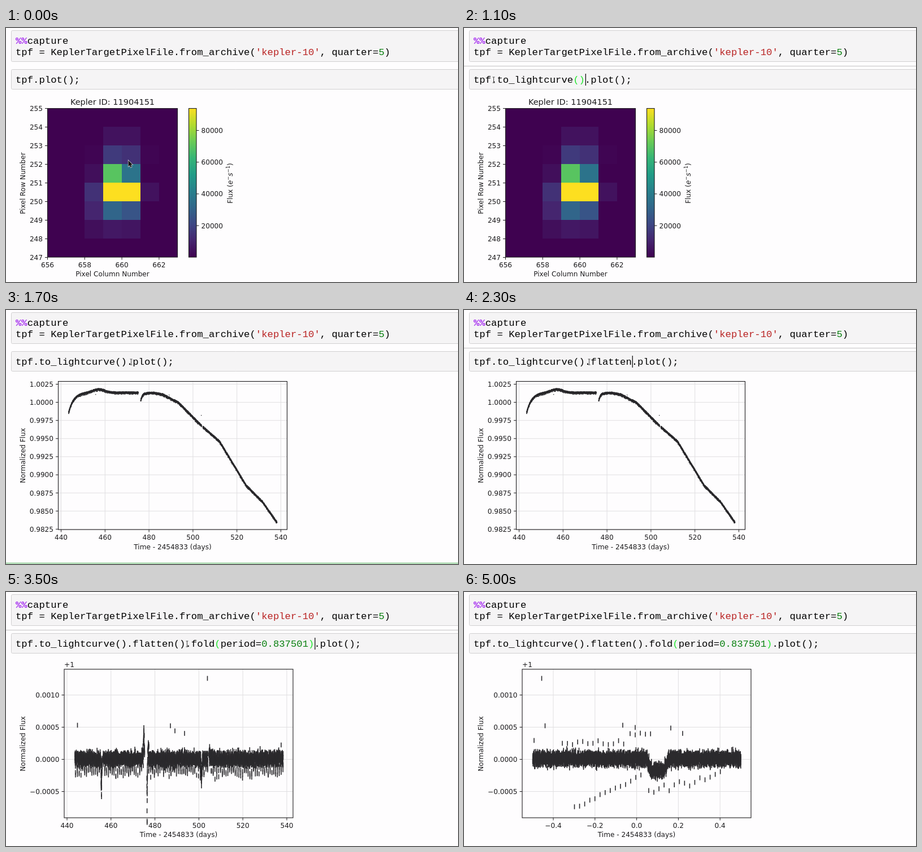
These frames come from a looping animation (800x450 px, 5100 ms). An HTML page with a canvas:

```html
<!DOCTYPE html>
<html lang="en">
<head>
<meta charset="utf-8">
<title>Light curve notebook</title>
<style>
html, body { margin: 0; width: 100%; height: 100%; overflow: hidden; background: #fefdfe; }
canvas { display: block; }
</style>
</head>
<body>
<canvas id="stage" width="800" height="450"></canvas>
<script>
const c = document.getElementById('stage').getContext('2d');
const LOOP = 5100, STEP = 100;
const INK = '#1c1b1d', MARK = '#2c2b2e', BRACKET = '#1fe62c', GREEN = '#0a8010';
const MONO = '17.27px "Liberation Mono", "Courier New", monospace';
const SANS = '"DejaVu Sans", sans-serif';
const CODE_X = 17, CODE_Y = 97;

// Each edit: click into the cell, type between start and end, then run.
const edits = [
  { click: 400, start: 500, end: 1000, run: 1200, text: '.to_lightcurve()' },
  { click: 1900, start: 2000, end: 2400, run: 2500, text: '.flatten()' },
  { click: 3000, start: 3100, end: 3500, run: 3700, text: '.fold(period=0.837501)' }
];

const clamp = v => Math.max(0, Math.min(1, v));
const lerp = (a, b, k) => a + (b - a) * k;
const ease = k => k * k * (3 - 2 * k);

function random(seed) {
  return () => (seed = (seed * 16807) % 2147483647) / 2147483647;
}

function line(x1, y1, x2, y2, color = INK, width = 1) {
  c.strokeStyle = color;
  c.lineWidth = width;
  c.beginPath();
  c.moveTo(x1, y1);
  c.lineTo(x2, y2);
  c.stroke();
}

function label(text, x, y, align = 'center', size = 12.1) {
  c.font = `${size}px ${SANS}`;
  c.fillStyle = INK;
  c.textAlign = align;
  c.fillText(text, x, y);
}

function vertical(x, y, draw) {
  c.save();
  c.translate(x, y);
  c.rotate(-Math.PI / 2);
  draw();
  c.restore();
}

/* ---------- notebook cells ---------- */

function cell(y, h) {
  c.fillStyle = '#f5f4f5';
  c.strokeStyle = '#d1d0d1';
  c.lineWidth = 1;
  c.beginPath();
  c.roundRect(9.5, y + .5, 820, h, 2);
  c.fill();
  c.stroke();
}

function code(parts, y) {
  let x = CODE_X;
  c.textAlign = 'left';
  for (const [text, color = '#000', bold = ''] of parts) {
    c.font = bold + MONO;
    c.fillStyle = color;
    c.fillText(text, x, y);
    x += c.measureText(text).width;
  }
}

// The bracket pair next to the caret, as two indices.
function matched(left) {
  const end = left.length;
  if (left.endsWith(')')) return [left.lastIndexOf('('), end - 1];
  return left.endsWith('(') ? [end - 1, end] : [];
}

function commandLine(t) {
  let left = 'tpf', right = '.plot();';
  const begun = edits.filter(e => t >= e.click), active = begun.at(-1);
  for (const e of begun) {
    const k = clamp((t - e.start + STEP) / (e.end - e.start + STEP));
    const typed = e.text.slice(0, Math.round(e.text.length * k));
    left += typed;
    if (typed.includes('(') && !typed.includes(')')) right = ')' + right;
  }
  const editing = active && t < active.run;
  const pair = editing || begun.length > 1 ? matched(left) : [];
  const text = left + right, number = text.search(/\d/);
  const isDigit = (ch, i) => number >= 0 && i >= number && i < number + 8 && /[\d.]/.test(ch);
  code([...text].map((ch, i) =>
    [ch, pair.includes(i) ? BRACKET : isDigit(ch, i) ? GREEN : '#000']), CODE_Y);
  if (editing) {
    const x = CODE_X + c.measureText(left).width + 1.5;
    line(x, 81, x, 102, '#111', 1.3);
    line(0, 67.5, 800, 67.5, '#c3c2c3');
  }
}

/* ---------- pointer ---------- */

function arrow(x, y) {
  c.beginPath();
  [[0, 0], [0, 11], [2.4, 8.8], [4.2, 12.4], [6, 11.6], [4.4, 8], [7.6, 7.8]]
    .forEach(([dx, dy]) => c.lineTo(x + dx, y + dy));
  c.closePath();
  c.fillStyle = '#111';
  c.strokeStyle = '#eee';
  c.lineWidth = 1.2;
  c.stroke();
  c.fill();
}

function beam(x, y) {
  line(x, y - 5, x, y + 5, '#444');
  for (const d of [-5, 5]) line(x - 2, y + d, x + 2, y + d, '#555');
}

function pointer(t) {
  if (t < 400) {
    const k = ease(clamp(t / 400));
    const x = lerp(216.5, 52.5, k), y = lerp(234.5, 92, k);
    y < 108 ? beam(x, y) : arrow(x, y);
  } else if (t < 2400) {
    beam(lerp(52.5, 221.5, ease(clamp((t - 1200) / 400))), 92);
  } else if (t >= 2800 && t < 3700) {
    beam(lerp(221.5, 320.5, ease(clamp((t - 2700) / 300))), 92);
  }
}

/* ---------- plots ---------- */

const ticks = (n, pos, step, text) => Array.from({ length: n }, (_, i) => [pos + i * step, text(i)]);
const days = x => ticks(6, x, 77.8, i => 440 + 20 * i);
const fixed = (v, n) => v.toFixed(n).replace('-', '−');

function axes(x, y, w, h, xTicks, yTicks, grid = true) {
  for (const [px, text] of xTicks) {
    if (grid) line(px, y, px, y + h, '#e0dfe1');
    line(px, y + h, px, y + h + 4.5);
    label(text, px, y + h + 18);
  }
  for (const [py, text] of yTicks) {
    if (grid) line(x, py, x + w, py, '#e0dfe1');
    line(x - 4.5, py, x, py);
    label(text, x - 8.5, py + 4.4, 'right');
  }
}

function box(x, y, w, h) {
  c.strokeStyle = INK;
  c.lineWidth = 1.1;
  c.strokeRect(x, y, w, h);
}

const palette = ['3f0250', '45256f', '3d4784', '31668a', '28808c', '219c87', '36b576', '6acb55', 'b2db2e', 'fddf20']
  .map(s => [0, 2, 4].map(i => parseInt(s.slice(i, i + 2), 16)));

function viridis(v) {
  const p = v * (palette.length - 1), i = Math.min(palette.length - 2, Math.floor(p));
  return `rgb(${palette[i].map((a, j) => Math.round(lerp(a, palette[i + 1][j], p - i)))})`;
}

// Percent of full flux around the star.
const flux = [
  [0, 5, 5, 0], [1, 18, 15, 1], [4, 74, 39, 0],
  [15, 100, 100, 5], [11, 33, 27, 0], [4, 7, 6, 0]
];

function pixelPlot() {
  c.fillStyle = viridis(0);
  c.fillRect(73, 142, 231, 264);
  flux.forEach((row, j) => row.forEach((v, i) => {
    c.fillStyle = viridis(v / 100);
    c.fillRect(139 + i * 33, 175 + j * 33, 33, 33);
  }));
  axes(73.5, 142.5, 230, 263.5,
    ticks(4, 73.5, 65.8, i => 656 + 2 * i), ticks(9, 142.5, 33, i => 255 - i), false);
  box(73.5, 142.5, 230, 263.5);
  label('Kepler ID: 11904151', 188.5, 135.5, 'center', 14.5);
  label('Pixel Column Number', 188.5, 440);
  vertical(34, 275, () => label('Pixel Row Number', 0, 0));

  const ramp = c.createLinearGradient(0, 406, 0, 142);
  palette.forEach((_, i) => ramp.addColorStop(i / 9, viridis(i / 9)));
  c.fillStyle = ramp;
  c.fillRect(324, 142, 13, 264);
  box(323.5, 142.5, 13.5, 263.5);
  for (let i = 1; i < 5; i++) {
    const y = 406.3 - i * 56.2;
    line(337, y, 341.5, y);
    label(i * 20000, 345.5, y + 4.4, 'left');
  }
  vertical(400.5, 311, () => {
    let x = 0;
    const put = (text, size = 12.1, up = 0, style = '') => {
      c.font = `${style}${size}px ${SANS}`;
      c.fillText(text, x, -up);
      x += c.measureText(text).width;
    };
    c.textAlign = 'left';
    c.fillStyle = INK;
    put('Flux (');
    put('e', 12.1, 0, 'italic ');
    put('−', 8.5, 4.5);
    put('s', 12.1, 0, 'italic ');
    put('−1', 8.5, 4.5);
    put(')');
  });
}

// Key points of the long decline.
const decline = [[238, 147], [262, 147], [278, 150], [305, 164], [346, 205], [378, 233],
  [410, 286], [425, 311], [454, 340], [480, 377]];

function brightness(x) {
  if (x < 236) return 146.5 + 35 * Math.exp((111 - x) / 9) - 6 * Math.exp(-(((x - 164) / 15) ** 2));
  const i = decline.findIndex(p => p[0] > x), [x0, y0] = decline[i - 1], [x1, y1] = decline[i];
  return lerp(y0, y1, (x - x0) / (x1 - x0)) + 14 * Math.exp((238.5 - x) / 3);
}

function lightCurve() {
  const rnd = random(11);
  axes(92.5, 126.5, 405, 262.5, days(97.5),
    ticks(9, 131.5, 32.1, i => (1.0025 - i * .0025).toFixed(4)));
  c.fillStyle = MARK;
  for (let x = 111; x < 479.5; x += .06) {
    if ((x > 234 && x < 238.5) || (x > 346 && x < 348.5)) continue;
    const dip = rnd() < .1 ? 1.6 : 0;
    c.fillRect(x - .8, brightness(x) - .8 + (rnd() + rnd() - 1) * 1.9 + dip, 1.6, 1.6);
  }
  for (const [x, y] of [[158, 149], [288, 150], [334, 197], [345, 186]]) c.fillRect(x, y, 1.3, 1.3);
  box(92.5, 126.5, 405, 262.5);
  label('Time - 2454833 (days)', 295, 423.5);
  vertical(34, 258, () => label('Normalized Flux', 0, 0));
}

function bar(x, y) {
  c.fillRect(x - .8, y - 4.3, 1.6, 8.6);
}

// Flattened samples: noise plus a periodic transit dip.
function samples(visit) {
  const rnd = random(2024), period = .837501;
  for (let i = 0; i < 4650; i++) {
    const day = (i + rnd()) * .02043;
    const phase = (day / period + .31) % 1 - .5;
    const noise = (rnd() + rnd() + rnd() + rnd() - 2) * 10;
    const dip = 20.5 * clamp((.052 - Math.abs(phase - .1)) / .02);
    visit(day, phase, 295.5 + noise + dip);
  }
}

function flatFrame(xTicks, draw) {
  axes(103, 136.8, 405, 263.2, xTicks, ticks(4, 182.5, 57, i => fixed(.001 - i * .0005, 4)));
  c.fillStyle = MARK;
  draw();
  box(103, 136.8, 405, 263.2);
  label('+1', 103, 133, 'left');
  label('Time - 2454833 (days)', 305.5, 434);
  vertical(34, 269, () => label('Normalized Flux', 0, 0));
}

// Spikes that fade to both sides: position, height, width.
const glitches = [[169, 65, .5], [244, -52, .9], [249.7, 88, .5], [252, -28, .8], [346, 45, .7], [360.2, -20, .8]];
const gaps = [[170.6, 172], [245.4, 249.3], [357.3, 359.3]];

function flatPlot() {
  flatFrame(days(108), () => {
    samples((day, phase, y) => {
      const x = 122 + day * 3.88;
      if (gaps.some(([a, b]) => x > a && x < b)) return;
      bar(x, glitches.reduce((sum, [at, h, w]) => sum + h * Math.exp(-Math.abs(x - at) / w), y));
    });
    for (const [x, y] of [[126.5, 236], [291, 237], [299, 246], [316, 250.5], [356.5, 153], [487, 271]]) bar(x, y);
  });
}

function foldPlot() {
  flatFrame(ticks(5, 158, 73.8, i => fixed(i * .2 - .4, 1)), () => {
    samples((day, phase, y) => bar(305.8 + phase * 368.5, y));
    // Each spike spreads into a trail, one sample every 9 px.
    const rnd = random(5);
    const trail = (n, x, y, slope, spread) => {
      for (let i = 0; i < n; i++) bar(x + i * 9.05, y + i * slope + (rnd() - .5) * spread);
    };
    trail(14, 195.5, 383, -4.4, 5);
    trail(15, 327, 355, -2.2, 14);
    trail(13, 174, 268, -.2, 9);
    trail(5, 294, 250, 1, 8);
    for (const [x, y] of [[137.5, 153], [143.5, 237], [124, 263], [281, 236], [303, 240], [366, 241], [387, 250.5]]) bar(x, y);
  });
}

const plots = [pixelPlot, lightCurve, flatPlot, foldPlot];

function draw(t) {
  c.fillStyle = '#fefdfe';
  c.fillRect(0, 0, 800, 450);
  cell(4, 55);
  cell(73, 35);
  code([['%%', '#a020f0', 'bold '], ['capture']], 28);
  code([['tpf = KeplerTargetPixelFile.from_archive('], ["'kepler-10'", '#b92222'],
    [', quarter='], ['5', GREEN], [')']], 48);
  commandLine(t);
  plots[edits.filter(e => t >= e.run).length]();
  if (t >= edits[0].run && t < edits[1].click) line(0, 448.5, 800, 448.5, '#7cc584', 1.4);
  pointer(t);
}

let shown = -1;
function tick(now) {
  const t = Math.floor(now % LOOP / STEP) * STEP;
  if (t !== shown) draw(shown = t);
  requestAnimationFrame(tick);
}
draw(0);
requestAnimationFrame(tick);
</script>
</body>
</html>
```
